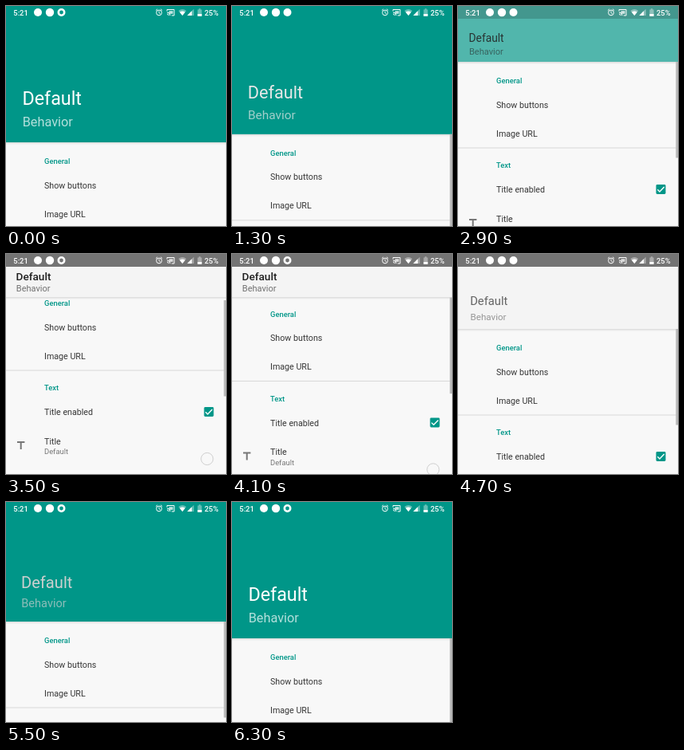
An HTML page with a canvas that plays this animation: 276x276 px, repeating every 6400 ms.

```html
<!DOCTYPE html>
<html lang="en">
<head>
<meta charset="utf-8">
<title>Collapsing toolbar</title>
<style>
html, body { margin: 0; width: 100%; height: 100%; overflow: hidden; background: #f8f8f8; }
canvas { display: block; width: 276px; height: 276px; }
</style>
</head>
<body>
<canvas></canvas>
<script>
const SIZE = 276, LOOP = 6400, STEP = 100;
const EXPANDED = 171, COLLAPSED = 54, STATUS = 16;
const TEAL = '#009688', INK = '#363636', GREY = '#777';

const canvas = document.querySelector('canvas');
const ctx = canvas.getContext('2d');
const ratio = window.devicePixelRatio || 1;
canvas.width = canvas.height = SIZE * ratio;
ctx.scale(ratio, ratio);

// Scroll offset of the list as [time, pixels]
const scrollKeys = [
  [900, 0], [1500, 19], [2100, 53], [2900, 101], [3500, 133], [3750, 136],
  [4000, 126], [4700, 77], [5500, 21], [5700, 5], [5900, 0]
];

const clamp = v => Math.min(1, Math.max(0, v));
const mix = (a, b, k) => a + (b - a) * k;

function slope(i) {
  const a = scrollKeys[i - 1], k = scrollKeys[i], b = scrollKeys[i + 1];
  if (!a || !b || (k[1] - a[1]) * (b[1] - k[1]) <= 0) return 0;
  return (b[1] - a[1]) / (b[0] - a[0]);
}

function scrollAt(t) {
  const i = scrollKeys.findIndex(k => t < k[0]);
  if (i <= 0) return 0;
  const [t0, y0] = scrollKeys[i - 1], [t1, y1] = scrollKeys[i];
  const d = t1 - t0, u = (t - t0) / d, v = 1 - u;
  return v * v * (1 + 2 * u) * y0 + u * u * (3 - 2 * u) * y1
    + d * u * v * (v * slope(i - 1) - u * slope(i));
}

function scrimAt(t) {
  if (t < 4000) return clamp((t - 2600) / 600) ** 1.6;
  return (1 - clamp((t - 4800) / 600)) ** 2.5;
}

function text(str, x, y, size, color, weight = 400) {
  ctx.font = `${weight} ${size}px Roboto, sans-serif`;
  ctx.fillStyle = color;
  ctx.fillText(str, x, y);
}

function rect(x, y, w, h, color) {
  ctx.fillStyle = color;
  ctx.fillRect(x, y, w, h);
}

function disc(x, y, r, color) {
  ctx.beginPath();
  ctx.arc(x, y, r, 0, 7);
  ctx.fillStyle = color;
  ctx.fill();
}

function ring(x, y, r, width, color) {
  ctx.beginPath();
  ctx.arc(x, y, r, 0, 7);
  ctx.lineWidth = width;
  ctx.strokeStyle = color;
  ctx.stroke();
}

function path(d, color, width) {
  const shape = new Path2D(d);
  if (width) {
    ctx.lineWidth = width;
    ctx.strokeStyle = color;
    ctx.stroke(shape);
  } else {
    ctx.fillStyle = color;
    ctx.fill(shape);
  }
}

function drawList(scroll) {
  ctx.save();
  ctx.translate(0, -scroll);
  text('General', 48, 198.3, 9.4, TEAL, 500);
  text('Show buttons', 48, 228.6, 10.7, INK);
  text('Image URL', 48, 264.6, 10.7, INK);
  rect(0, 278.5, SIZE, 1, '#d9d9d9');
  text('Text', 48, 304.3, 9.4, TEAL, 500);
  text('Title enabled', 48, 335.3, 10.7, INK);
  ctx.beginPath();
  ctx.roundRect(248.5, 325, 12, 12, 1.4);
  ctx.fillStyle = TEAL;
  ctx.fill();
  path('M250.3 331.2 l2.7 2.7 l5.7 -5.8', '#fff', 1.4);
  path('M14 368 h9.4 v2 h-3.7 v8 h-2 v-8 h-3.7 z', GREY);
  text('Title', 48, 371.6, 10.7, INK);
  text('Default', 48, 384.4, 9.4, GREY);
  ring(252.3, 390, 7.6, 0.8, '#c4c4c4');
  ctx.restore();
}

function drawStatus(solid) {
  const white = '#fff';
  text('5:21', 9.3, 12, 9.4, white, 500);
  disc(40, 8, 5, white);
  disc(55, 8, 5.2, white);
  if (solid) disc(69.5, 8, 5, white);
  else ring(69.5, 8, 3.7, 2.6, white);

  // Alarm
  ring(192, 8.4, 3.4, 1, white);
  path('M192 6.2 v2.5 l1.6 1 M187.9 5.6 l2.2 -1.9 M196.1 5.6 l-2.2 -1.9', white, 0.9);
  // Cast
  path('M202 6.5 v-2 h9 v7.4 h-3.2 M202 8 a4 4 0 0 1 4 4 M202 10 a2 2 0 0 1 2 2', white, 1);
  rect(204.5, 6.2, 5, 3.6, 'rgba(255,255,255,.75)');
  // Wi-Fi, signal, battery
  path('M216.4 6 Q221.3 2.2 226.2 6 L221.3 12 z', 'rgba(255,255,255,.4)');
  path('M217.9 7.8 Q221.3 5.4 224.7 7.8 L221.3 12 z', white);
  path('M227.3 12 L235.6 3.7 V12 z', 'rgba(255,255,255,.4)');
  path('M227.3 12 L233 6.3 V12 z', white);
  path('M240.4 4.4 h1.4 v-1.1 h2.4 v1.1 h1.4 v8.3 h-5.2 z', 'rgba(255,255,255,.4)');
  rect(240.4, 10, 5.2, 2.7, white);

  text('25%', 249, 12, 9.4, white, 500);
}

function drawHeader(scroll, scrim) {
  const p = clamp(scroll / (EXPANDED - COLLAPSED));
  const height = mix(EXPANDED, COLLAPSED, p);
  const shrink = 1 - (1 - p) ** 2;

  const shade = ctx.createLinearGradient(0, height, 0, height + 3);
  shade.addColorStop(0, 'rgba(0,0,0,.12)');
  shade.addColorStop(1, 'rgba(0,0,0,0)');
  rect(0, height, SIZE, 3, shade);

  rect(0, 0, SIZE, height, TEAL);
  rect(0, 0, SIZE, height, `rgba(244,244,244,${scrim})`);
  rect(0, 0, SIZE, STATUS, `rgba(0,0,0,${0.52 * scrim})`);

  const level = Math.round(255 * (1 - p));
  const tone = (from, to) => `rgba(${level},${level},${level},${mix(from, to, p)})`;
  const x = mix(20.4, 12.5, p);
  text('Default', x, mix(124.2, 33, p), mix(23.3, 13.6, shrink), tone(1, 0.87), p > 0.99 ? 500 : 400);
  text('Behavior', x + 0.3, mix(151, 47.3, p), mix(16.3, 11, shrink), tone(0.7, 0.54));
  return height;
}

function draw(now) {
  const t = Math.floor(now % LOOP / STEP) * STEP;
  const scroll = scrollAt(t);
  rect(0, 0, SIZE, SIZE, '#f8f8f8');
  drawList(scroll);
  const bottom = drawHeader(scroll, scrimAt(t));
  if (t >= 900) {
    const under = Math.max(0, scroll - EXPANDED + COLLAPSED);
    rect(273.3, bottom + under * 0.25, 2.7, 120.5, '#b9b9b9');
  }
  drawStatus((t + 1500) % 2000 < 1000);
}

const start = performance.now();
function tick() {
  draw(performance.now() - start);
  requestAnimationFrame(tick);
}
tick();
</script>
</body>
</html>
```
